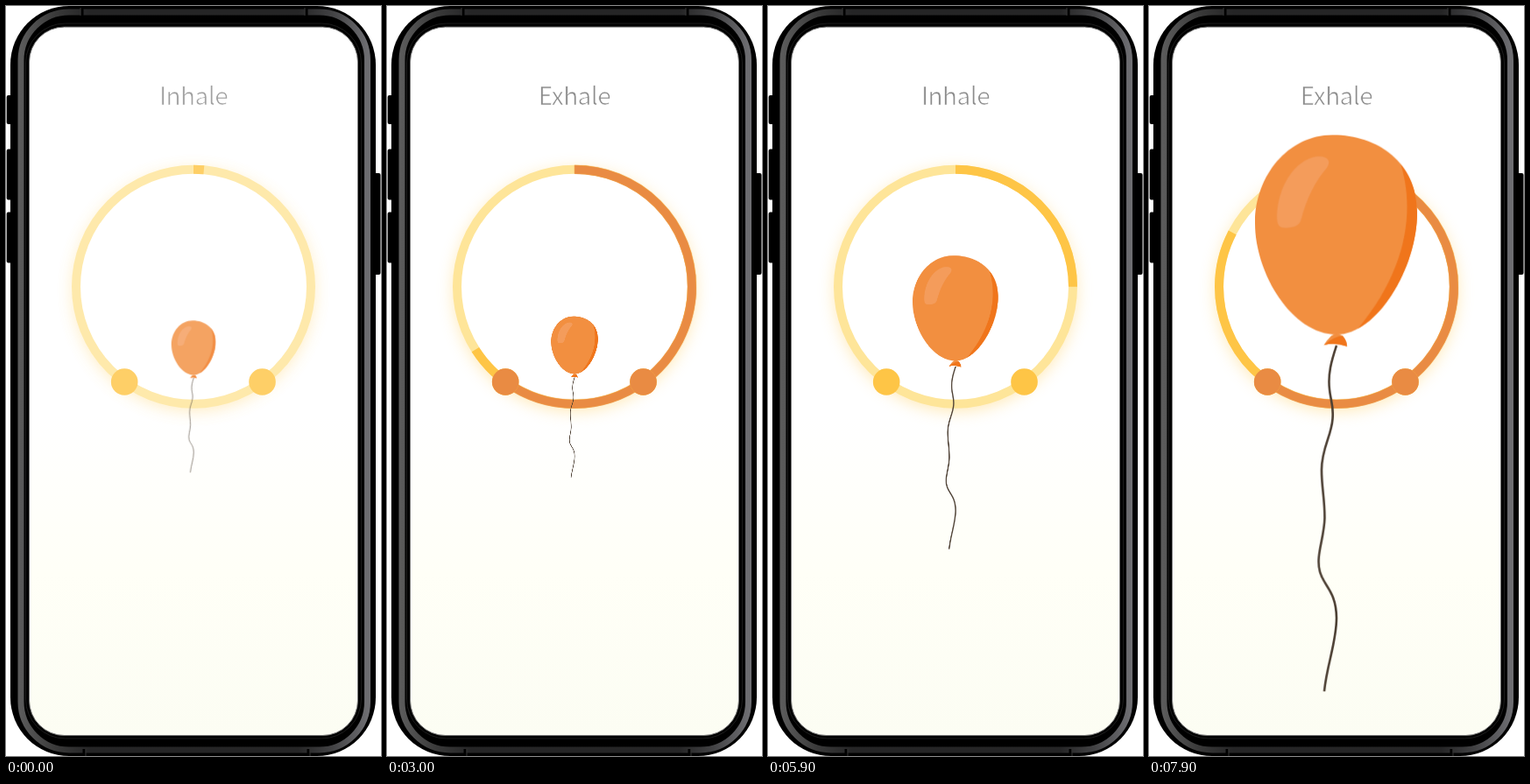
An HTML page for the animation above (8000 ms loop, 428x857 px).

```html
<!DOCTYPE html>
<html lang="en">
<head>
<meta charset="utf-8">
<title>Breathing exercise</title>
<style>
  html, body { margin: 0; width: 100%; height: 100%; overflow: hidden; background: #fff; }
  svg { display: block; width: 428px; height: 857px; }

  /* Every part shares one 8 s clock. */
  .anim { animation: 8s linear infinite; }
  .hard { animation-timing-function: step-end; }

  /* The white outline thins the regular weight to a light one. */
  .word {
    font: 300 28px "Noto Sans CJK JP", "Noto Sans CJK SC", "Noto Sans CJK", "Noto Sans", sans-serif;
    letter-spacing: -.55px; text-anchor: middle;
    fill: #8c8c8c; stroke: #fff; stroke-width: .7px;
  }
  .arc { fill: none; stroke-width: 10; }
  .done { stroke: #e98b43; }
  .pale { stroke: #fee599; }
  .front { stroke: #fec546; stroke-dasharray: 360 400; animation-name: front; }
  .disc { filter: drop-shadow(0 4px 9px rgba(255, 203, 80, .42)); }

  #stage { animation-name: appear; }
  #inhale { animation-name: inhale; }
  #hold { animation-name: hold; }
  #exhale { animation-name: exhale; }
  .first { animation-name: first; }
  .second { animation-name: second; }
  .third { animation-name: third; }
  .dotA { animation-name: dot-a; }
  .dotB { animation-name: dot-b; }
  #balloon { transform-origin: 214.2px 439px; animation-name: inflate; }

  @keyframes appear { 0% { opacity: .82 } 2.5%, 100% { opacity: 1 } }

  @keyframes inhale { 0%, 59.375% { opacity: 1 } 21.875%, 76.25%, 100% { opacity: 0 } }
  @keyframes hold { 0%, 34.375%, 85.625%, 100% { opacity: 0 } 21.875%, 76.25% { opacity: 1 } }
  @keyframes exhale { 0%, 59.375% { opacity: 0 } 34.375%, 85.625%, 100% { opacity: 1 } 76.25% { opacity: 0 } }

  @keyframes front {
    0% { stroke-dashoffset: 355 }
    57.26%, 59.24% { stroke-dashoffset: 0 }
    59.25% { stroke-dashoffset: 360 }
    76.24% { stroke-dashoffset: 254.6 }
    76.25% { stroke-dashoffset: 201.5 }
    100% { stroke-dashoffset: 54.8 }
  }

  @keyframes first {
    0%, 22.42%, 61.25%, 76.24% { opacity: 0 }
    23.67%, 59.25%, 76.25%, 100% { opacity: 1 }
  }
  @keyframes second {
    0%, 34.04%, 61.25%, 85.56% { opacity: 0 }
    35.29%, 59.25%, 86.81%, 100% { opacity: 1 }
  }
  @keyframes third {
    0%, 57.26%, 61.25%, 100% { opacity: 0 }
    58.25%, 59.25% { opacity: 1 }
  }
  @keyframes dot-a {
    0%, 22.42%, 59.1%, 76.24% { opacity: 0 }
    23.67%, 57.26%, 76.25%, 100% { opacity: 1 }
  }
  @keyframes dot-b {
    0%, 34.04%, 59.1%, 85.56% { opacity: 0 }
    35.29%, 57.26%, 86.81%, 100% { opacity: 1 }
  }

  /* The last growth is cut off by the loop, so its curve is the first part of "ease". */
  @keyframes inflate {
    0% { transform: scale(.2733) }
    35.975% { transform: scale(.2733); animation-timing-function: ease }
    55.35%, 76.24% { transform: scale(.5279) }
    76.25% { transform: scale(.782) }
    87.5% { transform: scale(.782); animation-timing-function: cubic-bezier(.314, .089, .373, .75) }
    100% { transform: scale(1.011) }
  }
</style>
</head>
<body>
<svg viewBox="0 0 428 857">
  <defs>
    <linearGradient id="metal">
      <stop offset="0" stop-color="#5a5a5a"/>
      <stop offset=".1" stop-color="#3a3a3a"/>
      <stop offset=".2" stop-color="#252526"/>
      <stop offset=".8" stop-color="#252526"/>
      <stop offset=".9" stop-color="#434345"/>
      <stop offset="1" stop-color="#6d6d71"/>
    </linearGradient>
    <linearGradient id="paper" x2="0" y2="1">
      <stop offset=".55" stop-color="#fff"/>
      <stop offset=".77" stop-color="#fffff7"/>
      <stop offset="1" stop-color="#fcfdf3"/>
    </linearGradient>
    <path id="body" d="M210 147.500C160 147 121 193 121 248C121 307 164 375.500 214 375.500C260 375.500 306 300 306 236C306 178 260 147.500 210 147.500Z"/>
    <clipPath id="inside"><use href="#body"/></clipPath>
  </defs>

  <g id="phone">
    <rect x=".7" y="102" width="8" height="33" rx="2"/>
    <rect x=".7" y="163.500" width="8" height="58" rx="2"/>
    <rect x=".7" y="235.500" width="8" height="58" rx="2"/>
    <rect x="419" y="191" width="8.500" height="116" rx="2"/>
    <rect x="5" width="417" height="857" rx="67"/>
    <rect x="17" y="7" width="395.500" height="843" rx="55" fill="none" stroke="url(#metal)" stroke-width="7"/>
    <path d="M87 2v9M343 2v9M89 849v8M345 849v8" stroke="#000" stroke-width="3"/>
    <path d="M85 2v9M341 2v9M91 849v8M347 849v8" stroke="#333" stroke-width="1"/>
    <rect x="22.500" y="20" width="383" height="817" rx="45" fill="none" stroke="#1d1d1d"/>
    <rect x="26.500" y="24" width="375" height="809.500" rx="40" fill="url(#paper)" stroke="#777" stroke-width="1"/>
  </g>

  <g id="stage" class="anim">
    <g class="word">
      <text id="inhale" class="anim hard" x="214" y="112.500">Inhale</text>
      <text id="hold" class="anim hard" x="214" y="112.500">Hold</text>
      <text id="exhale" class="anim hard" x="214" y="112.500">Exhale</text>
    </g>

    <circle class="disc" cx="214" cy="320.800" r="138" fill="#fff"/>
    <g class="arc" transform="rotate(-90 214 320.800)">
      <circle class="pale" cx="214" cy="320.800" r="134"/>
      <circle class="front anim" cx="214" cy="320.800" r="134" pathLength="360"/>
      <circle class="done first anim" cx="214" cy="320.800" r="134" pathLength="360" stroke-dasharray="144 360"/>
      <circle class="done second anim" cx="214" cy="320.800" r="134" pathLength="360" stroke-dasharray="0 144 72 360"/>
      <circle class="done third anim" cx="214" cy="320.800" r="134" pathLength="360" stroke-dasharray="0 216 144 360"/>
    </g>
    <g fill="#fec546">
      <circle cx="292.500" cy="429.500" r="15.300"/>
      <circle cx="135.200" cy="429.500" r="15.300"/>
    </g>
    <g fill="#e98b43">
      <circle class="dotA anim" cx="292.500" cy="429.500" r="15.300"/>
      <circle class="dotB anim" cx="135.200" cy="429.500" r="15.300"/>
    </g>

    <g id="balloon" class="anim">
      <path d="M214 388C208 406 204 421 206 438C207 450 211 456 209.500 472C208 492 197 505 197 530C197 550 200.500 562 200.500 585C200 608 190 628 195 646C200 664 213.500 668 214 699C214 727 203 752 200 783" fill="none" stroke="#4d4034" stroke-width="2.600"/>
      <use href="#body" fill="#f28f40"/>
      <path d="M286 177C304 230 296 300 238 369L320 380V177Z" fill="#f0751b" clip-path="url(#inside)"/>
      <path d="M192 172C205 171 208 178 203 185C190 200 180 220 174 243C172 252 165 253 157 253.500C148 254 146 250 146 240C147 208 165 176 192 172Z" fill="#f49c5b"/>
      <path d="M208 377Q214 372 221 377Q226 383 226 389Q212 384 199.500 387.500Q203 382 208 377Z" fill="#f28f40"/>
      <path d="M221 377Q226 383 226 389Q212 384 199.500 387.500Q212 377 221 377Z" fill="#f0751b"/>
    </g>
  </g>
</svg>
</body>
</html>
```
